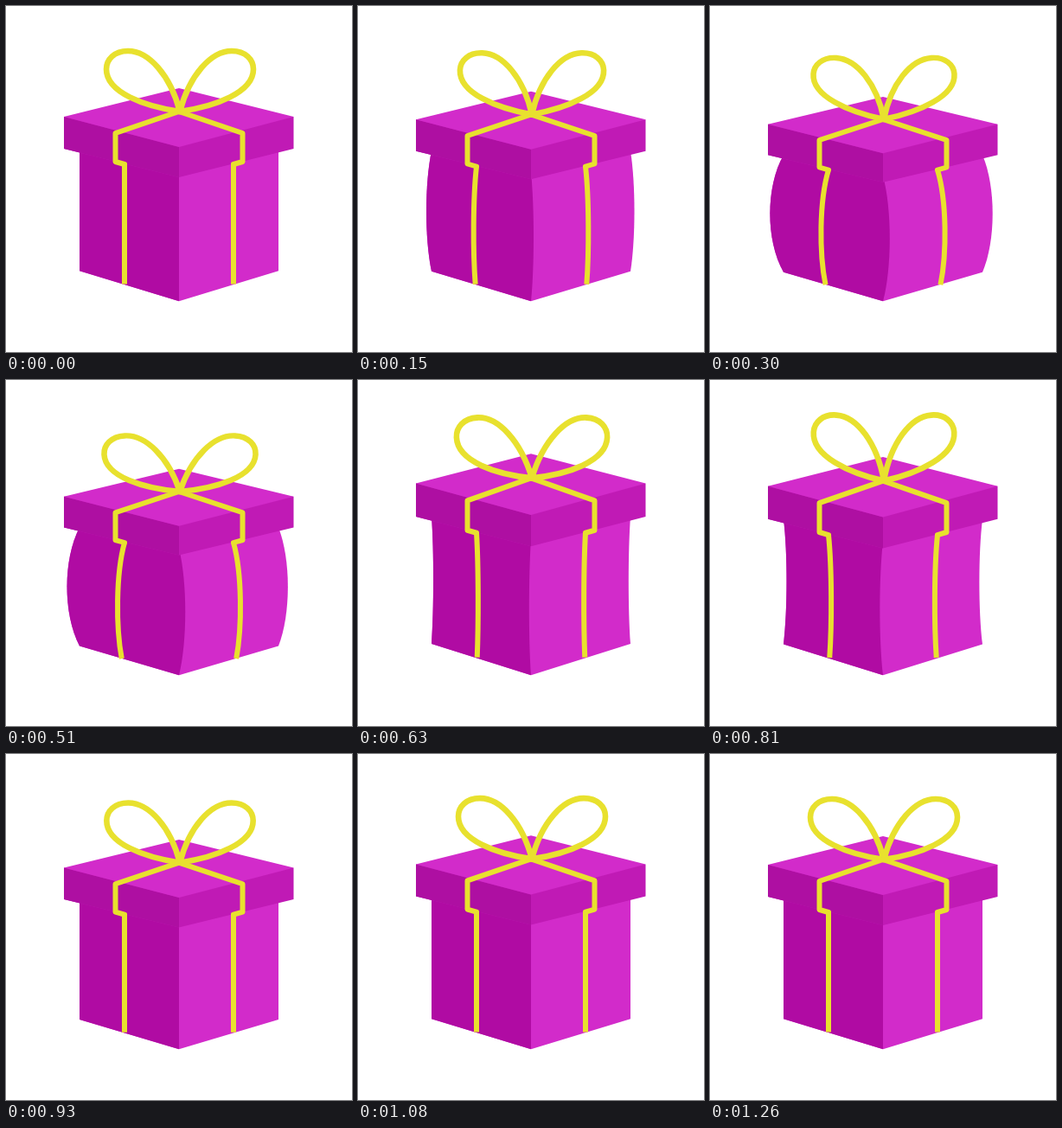
Write an HTML page that moves like this. It is 400 px wide and 400 px high and loops after 1.32 s.

```html
<!DOCTYPE html>
<html lang="en">
<head>
<meta charset="utf-8">
<title>Bouncing gift box</title>
<style>
  html, body { margin: 0; width: 100%; height: 100%; overflow: hidden; background: #fff; }
  svg { display: block; width: 100vw; height: 100vh; }
  .light { fill: #d22bca; }
  .dark { fill: #b00ba3; }
  .ribbon { fill: none; stroke: #e8e12e; stroke-width: 6; stroke-linejoin: round; }
  .bow { stroke-width: 6.6; }
</style>
</head>
<body>
<svg viewBox="0 0 400 400">
  <g id="gift">
    <path id="body" class="light"/>
    <path id="shade" class="dark"/>

    <path fill="#c01ab5" d="M67 128H332.5V165L200 198L67 165Z"/>
    <path fill="#ae0fa2" d="M67 128L200 163V198L67 165Z"/>
    <path class="light" d="M67 128L200 95L332.5 128L200 163Z"/>

    <g class="ribbon">
      <path id="band"/>
      <use href="#band" transform="translate(400) scale(-1 1)"/>
      <path stroke-linecap="round" d="M137 183L126.5 180V147L200 122L273.5 147V180L263 183"/>
      <g class="bow">
        <path id="loop" d="M201 122C190 80 165 52 141 52C125 52 116 62 116 73C116 100 160 116 201 122Z"/>
        <use href="#loop" transform="translate(402) scale(-1 1)"/>
      </g>
    </g>
  </g>
</svg>
<script>
  const LOOP = 1320;
  const [gift, body, shade, band, loop] =
    ['gift', 'body', 'shade', 'band', 'loop'].map(id => document.getElementById(id));

  // Key points: [time in ms, value]
  const stretch = [[0, 1], [390, .953], [450, .953], [720, 1.069], [900, .982], [1110, 1.004], [1260, 1]];
  const bulge = [[0, 0], [390, 18], [450, 18], [720, -9], [880, 0]];
  const flap = [[0, 0], [285, 4], [570, -4], [800, 4.2], [960, 0]];

  const smooth = u => u * u * (3 - 2 * u);

  function valueAt(keys, t) {
    const next = keys.findIndex(([time]) => time > t);
    if (next < 0) return keys[keys.length - 1][1];
    const [t0, v0] = keys[next - 1];
    const [t1, v1] = keys[next];
    return v0 + (v1 - v0) * smooth((t - t0) / (t1 - t0));
  }

  // An upright edge bent sideways: outward by its own share, inward evenly.
  function edge(x, top, bottom, share, bend, slip = 0) {
    const shift = bend * (bend > 0 ? share : Math.sign(share));
    const foot = shift * slip;
    const pull = x + (shift - foot / 2) / .75;
    const y = k => top + (bottom - top) * k;
    return [[x, top], [pull, y(.27)], [pull, y(.73)], [x + foot, bottom]];
  }

  const curve = ([start, ...rest]) => `${start}C${rest.join(' ')}`;

  function draw(t) {
    const bend = valueAt(bulge, t);
    const left = curve(edge(85, 165, 306.3, -1, bend));
    const right = curve(edge(315, 165, 306.3, .75, bend).reverse());
    const middle = curve(edge(200, 190, 341.3, .5, bend).reverse());

    body.setAttribute('d', `M${left}L200 341.3L${right}Z`);
    shade.setAttribute('d', `M${left}L${middle}Z`);
    band.setAttribute('d', `M${curve(edge(137, 183, 321.5, -.63, bend, .35))}`);
    loop.setAttribute('transform', `rotate(${valueAt(flap, t)} 201 122)`);
    gift.setAttribute('transform', `translate(0 341) scale(1 ${valueAt(stretch, t)}) translate(0 -341)`);
  }

  const start = performance.now();
  function tick() {
    draw((performance.now() - start) % LOOP);
    requestAnimationFrame(tick);
  }
  tick();
</script>
</body>
</html>
```
